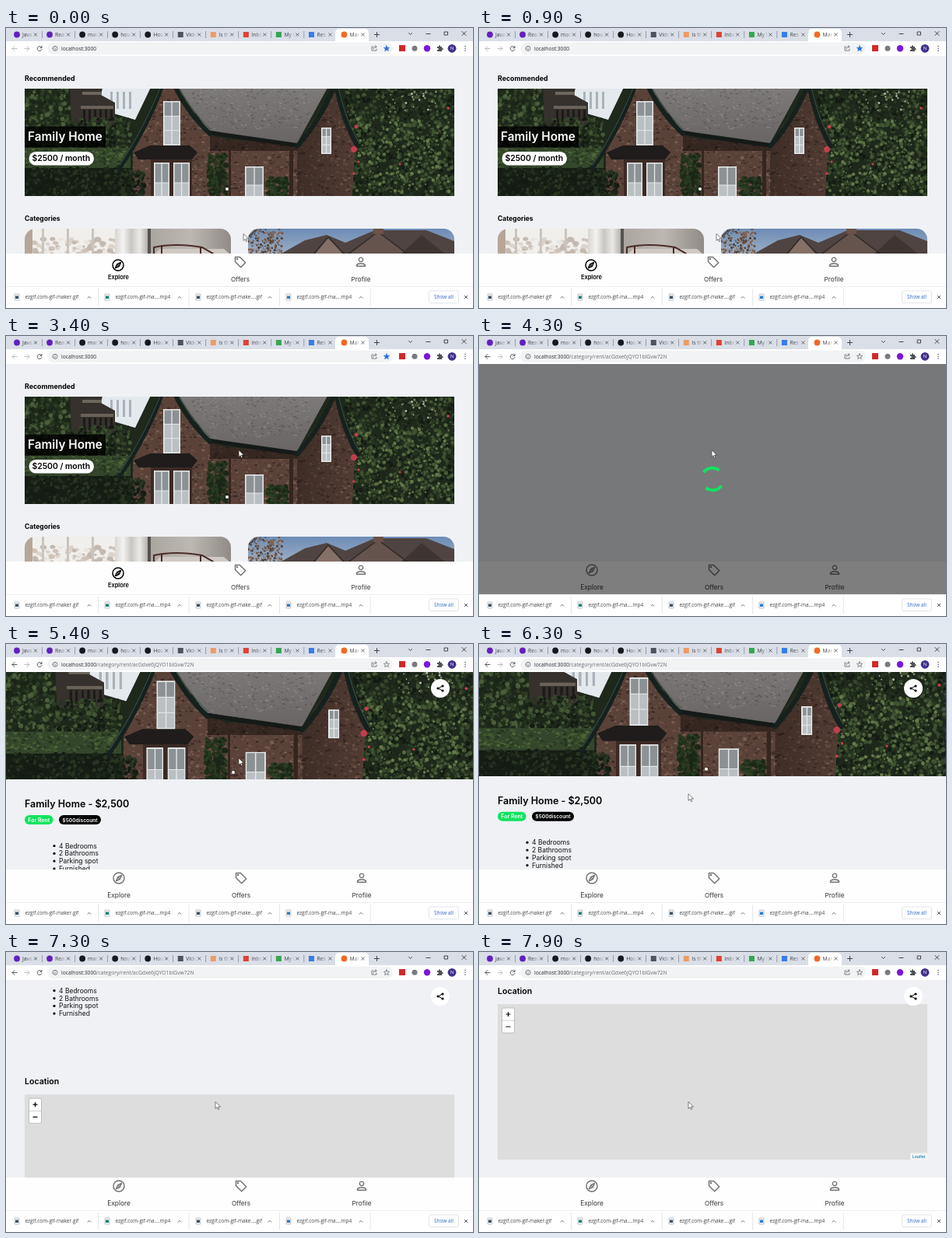
An HTML page with a canvas for the animation above (8 s loop, 600x360 px).

```html
<!DOCTYPE html>
<html lang="en">
<head>
<meta charset="utf-8">
<title>House listing</title>
<style>
html, body { margin: 0; width: 100%; height: 100%; overflow: hidden; background: #fff; }
canvas { display: block; width: 600px; height: 360px; }
</style>
</head>
<body>
<canvas id="stage" width="600" height="360"></canvas>
<script>
const LOOP = 8000, STEP = 100;
const LOAD_START = 3900, LOAD_END = 4700;
const UI = '"Open Sans", "Noto Sans", sans-serif', PAGE = 'Inter, Roboto, sans-serif';
const BG = '#eff1f5', GREEN = '#10e35f';
let g = document.getElementById('stage').getContext('2d');

// Drawing helpers
function rect(x, y, w, h, color) { g.fillStyle = color; g.fillRect(x, y, w, h); }
function round(x, y, w, h, r, fill, line) {
  g.beginPath(); g.roundRect(x, y, w, h, r);
  if (fill) { g.fillStyle = fill; g.fill(); }
  if (line) { g.strokeStyle = line; g.lineWidth = .7; g.stroke(); }
}
function dot(x, y, r, color) {
  g.beginPath(); g.arc(x, y, r, 0, 7); g.fillStyle = color; g.fill();
}
function poly(color, ...pts) {
  g.beginPath();
  for (let i = 0; i < pts.length; i += 2) g.lineTo(pts[i], pts[i + 1]);
  g.closePath(); g.fillStyle = color; g.fill();
}
function stroke(d, x, y, color, width = 1) {
  g.save(); g.translate(x, y);
  g.strokeStyle = color; g.lineWidth = width;
  g.lineCap = g.lineJoin = 'round';
  g.stroke(new Path2D(d)); g.restore();
}
function text(s, x, y, size, color, weight = 400, family = PAGE, align = 'left') {
  g.font = `${weight} ${size}px ${family}`;
  g.textAlign = align; g.fillStyle = color; g.fillText(s, x, y);
}
function shade(x0, y0, x1, y1, ...colors) {
  const s = g.createLinearGradient(x0, y0, x1, y1);
  colors.forEach((c, i) => s.addColorStop(i / (colors.length - 1), c));
  return s;
}
function seeded(seed) {
  return () => (seed = (seed * 16807) % 2147483647) / 2147483647;
}
function specks(n, x, y, w, h, size, colors, flat = 1) {
  const rnd = seeded(n * 31 + x);
  for (let i = 0; i < n; i++) {
    const px = x + rnd() * w, py = y + rnd() * h, s = size * (.5 + rnd());
    g.fillStyle = colors[Math.floor(rnd() * colors.length)];
    g.beginPath(); g.ellipse(px, py, s, s * flat, rnd() * (flat === 1 ? 3 : .2), 0, 7); g.fill();
  }
}
function pane(x, y, w, h, rows) {
  rect(x, y, w, h, '#e6e8e8');
  const pw = w / 2 - 2.2, ph = (h - 2) / rows - 1;
  for (let c = 0; c < 2; c++) for (let r = 0; r < rows; r++)
    rect(x + 1.6 + c * (pw + 1.3), y + 1.5 + r * (ph + 1), pw, ph, r ? '#b9bfc2' : '#8b9194');
}

// House photo in flat shapes, covering x 24-576 and y 78-216
function paintHouse() {
  const dark = ['#141b13', '#1d281a', '#273521'], leaf = [...dark, '#34462a', '#435734'];
  rect(24, 68, 552, 158, '#1e281b');

  // Garden and old tower on the left
  poly('#e4e9ee', 118, 68, 190, 68, 166, 118, 118, 104);
  for (let x = 134; x < 164; x += 8) rect(x, 82, 3, 22, '#a9b2b9');
  specks(420, 24, 70, 62, 84, 2, ['#2b3b24', '#3a4e2f', '#1a2417', '#223019', '#4a5e3a']);
  poly('#36312d', 82, 68, 126, 68, 122, 86, 140, 96, 140, 126, 84, 126);
  rect(98, 82, 25, 4, '#6d665c'); rect(96, 100, 42, 4, '#6a6258');
  for (let x = 99; x < 138; x += 7) rect(x, 105, 3, 14, '#1d1b19');
  specks(320, 84, 116, 76, 38, 1.9, leaf);
  rect(24, 154, 136, 26, '#34462c');
  specks(300, 24, 155, 130, 22, 1.8, ['#41582f', '#33472a', '#4e6538', '#263620'], .6);
  rect(24, 180, 150, 46, '#151d14');
  specks(320, 24, 180, 145, 36, 1.8, dark);

  // Shrubs on the right
  specks(1500, 436, 72, 142, 148, 1.9, leaf);
  specks(260, 450, 112, 120, 100, 1.7, ['#566b40', '#63794a', '#3d5230']);
  specks(34, 488, 74, 68, 34, 1, ['#a9b29f', '#7e8c72']);

  // Stone walls
  g.save(); g.beginPath();
  for (const [x, y] of [[201, 68], [218, 68], [258, 136], [285, 143], [374, 150], [424, 76],
    [449, 150], [444, 226], [163, 226], [163, 155]]) g.lineTo(x, y);
  g.clip();
  rect(150, 68, 310, 160, '#5a4239');
  specks(2100, 155, 68, 295, 152, 1.5, ['#6f5348', '#46322c', '#7c6055', '#3d2b27', '#614840'], .6);
  rect(262, 132, 112, 26, 'rgba(18,12,11,.5)');
  rect(374, 68, 80, 158, shade(374, 0, 452, 0, 'rgba(20,14,12,.4)', 'rgba(20,14,12,.1)'));
  rect(286, 150, 3, 70, '#35251f'); rect(364, 150, 5, 70, '#35251f');
  g.restore();

  // Slate roof with its eaves and barge boards
  poly(shade(0, 78, 0, 145, '#7d7a79', '#6a6666'), 214, 68, 418, 68, 374, 148, 290, 136, 260, 132);
  g.save(); g.globalAlpha = .5;
  specks(700, 240, 72, 150, 58, 1.3, ['#959190', '#4f4b4c', '#757172'], .5);
  g.restore();
  stroke('M260 134L290 139L374 151', 0, 0, '#151918', 5);
  stroke('M203 66Q184 125 143 184', 0, 0, '#16211d', 6);
  stroke('M214 68Q232 108 262 136', 0, 0, '#16211d', 6);
  stroke('M423 72Q405 118 374 152', 0, 0, '#16211d', 6);
  stroke('M424 72Q433 120 452 152', 0, 0, '#16211d', 6);
  stroke('M200 72Q179 126 146 176M219 70Q236 104 262 130M426 72Q436 118 453 146', 0, 0, '#3c554b', .9);

  pane(202, 94, 22, 57, 3);
  poly('#1f1c1b', 164, 160, 185, 151, 236, 151, 246, 160, 239, 169, 170, 169);
  rect(186, 169, 53, 50, '#3b2a25');
  pane(190, 173, 20, 52, 2); pane(215, 173, 21, 52, 2);
  pane(307, 178, 24, 48, 2); pane(405, 128, 13, 34, 3);
  specks(240, 260, 162, 24, 54, 2, ['#1a2617', '#283a21', '#213019']);
  specks(120, 335, 192, 27, 26, 2, ['#1b2818', '#2a3d23', '#202f1b']);
  specks(130, 138, 184, 40, 34, 2, dark);
  for (const [x, y, r] of [[447, 156, 4], [450, 127, 2.5], [453, 172, 1.6], [447, 187, 1.8], [506, 175, 1.5], [568, 103, 1.8]])
    dot(x, y, r, '#c23f4c');
}
function paintRoom() {
  rect(24, 258, 265, 34, '#f1efec');
  specks(90, 36, 270, 105, 22, 3, ['#dcd3ca', '#cfc3b8', '#e9e5e0', '#c3b9b0'], .7);
  rect(24, 258, 10, 34, '#b7a698');
  for (const x of [46, 78, 110]) rect(x, 258, 3, 34, '#c9c4be');
  rect(140, 258, 42, 34, shade(140, 0, 182, 0, '#d9d6d2', '#f4f3f1', '#c9c6c2', '#eceae7', '#b5b2ae'));
  rect(182, 258, 4, 34, '#55524f');
  rect(186, 258, 103, 34, shade(186, 0, 289, 0, '#aba69f', '#bdb8b1', '#908b86'));
  poly('#cfc9c4', 198, 284, 280, 284, 289, 292, 190, 292);
  stroke('M190 290V282Q218 276 252 282L266 290M200 280V290M250 282V290', 0, 0, '#4a2a26', 2);
}
function paintRoofs() {
  rect(311, 258, 265, 34, shade(0, 258, 0, 290, '#6d8cb6', '#9dafc5'));
  specks(260, 311, 258, 44, 34, 1.1, ['#6a5040', '#855f48', '#4a4039', '#8d97a8']);
  poly('#4f4441', 350, 292, 384, 273, 412, 266, 436, 276, 474, 260, 540, 260, 576, 274, 576, 292);
  poly('#857067', 396, 292, 414, 270, 434, 292);
  poly('#65544d', 440, 292, 478, 263, 516, 292);
  poly('#3e3533', 506, 292, 534, 266, 566, 292);
  stroke('M394 292L414 269L436 292M438 292L478 262L518 292', 0, 0, '#302a29', 1.4);
  rect(472, 258, 13, 7, '#6b5149');
}

// Static pictures are painted once at double size
function picture(x, y, w, h, paint) {
  const c = document.createElement('canvas');
  c.width = w * 2; c.height = h * 2;
  const keep = g;
  g = c.getContext('2d'); g.scale(2, 2); g.translate(-x, -y);
  paint();
  g = keep;
  return c;
}
const house = picture(24, 78, 552, 138, paintHouse);
const room = picture(24, 258, 265, 34, paintRoom);
const roofs = picture(311, 258, 265, 34, paintRoofs);

function card(img, x) {
  g.save(); g.beginPath(); g.roundRect(x, 258, 265, 60, 14); g.clip();
  g.drawImage(img, x, 258, 265, 34); g.restore();
}

// Browser frame
const TABS = [['Java', '#6220bd'], ['Reac', '#6220bd'], ['mac', '#15191e'], ['hous', '#15191e'],
  ['Hou', '#15191e'], ['Vide', '#4b5260', 1], ['Is th', '#ee9b67', 1], ['Inbo', '#db4335', 1],
  ['My D', '#35a653', 1], ['Res', '#377de8', 1], ['Mar', '#ed6a28']];
const CROSS = 'M-1.7 -1.7L1.7 1.7M1.7 -1.7L-1.7 1.7';

function drawTop(home) {
  rect(0, 0, 600, 18, '#dadee7');
  round(423, 1, 43, 22, [5, 5, 0, 0], '#fff');
  rect(0, 17, 600, 19, '#fff');
  TABS.forEach(([name, color, square], i) => {
    const x = 14 + i * 42.05;
    if (square) rect(x - 3.5, 5, 7, 7, color); else dot(x, 8.5, 3.9, color);
    text(name, x + 7, 11, 6.8, shade(x + 12, 0, x + 21, 0, '#3d4149', 'rgba(61,65,73,0)'), 400, UI);
    stroke(CROSS, x + 24, 8.5, '#42464e', .8);
    if (i < 9) rect(x + 32, 4, .8, 9, '#858b9b');
  });
  stroke('M-3 0H3M0 -3V3', 476.5, 8.5, '#3d424c');
  stroke('M-2 -1L0 1L2 -1', 519.5, 7.5, '#363a42', .9);
  stroke('M-2.5 0H2.5', 542.5, 7.5, '#222', .8);
  stroke('M-2 -2H2V2H-2Z', 565.5, 7, '#222', .8);
  stroke('M-2.5 -2.5L2.5 2.5M2.5 -2.5L-2.5 2.5', 588.5, 7, '#222', .8);

  stroke('M3 0H-3M0 -3L-3 0L0 3', 11, 26.5, home ? '#babdc2' : '#55595f');
  stroke('M-3 0H3M0 -3L3 0L0 3', 27, 26.5, '#babdc2');
  stroke('M2.6 -1.8A3 3 0 1 0 3 1M3 -3.2V-1H.8', 43, 26.5, '#55595f');
  round(53, 18.5, 444, 15.5, 8, '#f1f3f4');
  stroke('M-3 0A3 3 0 1 0 3 0A3 3 0 1 0 -3 0M0 0V1.5M0 -1.5V-1.4', 63, 26.3, '#5f6368', .8);
  text('localhost:3000', 71, 28.7, 6.7, '#25282c', 400, UI);
  if (!home) {
    const start = 71 + g.measureText('localhost:3000').width;
    text('/category/rent/acGdxe6jQYO1bIGvw72N', start, 28.7, 6.7, '#6a6e73', 400, UI);
  }
  stroke('M-1 -2H-3V3H3V1M-1 1Q-1 -2 3 -2M1.5 -3.5L3 -2L1.5 -.5', 473, 26, '#5f6368', .8);
  const star = 'M0 -3.5L1 -1.1L3.6 -1L1.6 .7L2.3 3.2L0 1.8L-2.3 3.2L-1.6 .7L-3.6 -1L-1 -1.1Z';
  if (home) {
    g.save(); g.translate(489, 26.3); g.fillStyle = '#2a6fdc'; g.fill(new Path2D(star)); g.restore();
  }
  stroke(star, 489, 26.3, home ? '#2a6fdc' : '#5f6368', .7);
  rect(505, 22, 8, 8, '#cf2929');
  dot(525, 26.3, 3.5, '#777b80');
  dot(541, 26.3, 4.2, '#7a18d6');
  poly('#4f5358', 554, 24, 556, 24, 556, 22.5, 558, 22.5, 558, 24, 560, 24, 560, 26, 561.5, 26,
    561.5, 28, 560, 28, 560, 30, 554, 30, 554, 28, 555.5, 28, 555.5, 26, 554, 26);
  dot(573, 26.3, 5.4, '#40308f');
  text('N', 573, 28.4, 6, '#fff', 400, UI, 'center');
  for (const y of [23.5, 26.3, 29.1]) dot(590, y, .8, '#55595f');
}
function drawDownloads() {
  rect(0, 332, 600, 28, '#fff');
  rect(0, 332, 600, .7, '#e3e5e8');
  [['ezgif.com-gif-maker.gif', 14, 107], ['ezgif.com-gif-ma....mp4', 130, 223],
    ['ezgif.com-gif-make....gif', 247, 339], ['ezgif.com-gif-ma....mp4', 363, 456]]
    .forEach(([name, x, arrow], i) => {
      round(x - 3, 342, 6, 8, .5, '#f2f4f7', '#a6adb7');
      rect(x - 2, 344.5, 4, 3.5, ['#3d5362', '#188477', '#3d5362', '#267dcc'][i]);
      text(name, x + 10.5, 348.3, 6.5, '#414448', 400, UI);
      stroke('M-2 1L0 -1L2 1', arrow, 346.3, '#62666b', .9);
      rect(118.3 + i * 116.5, 335, .7, 22, '#d9dbdf');
    });
  round(543.5, 338, 38, 15.5, 2, '#fff', '#d5d9df');
  text('Show all', 562.5, 348.2, 6.5, '#2c67c5', 400, UI, 'center');
  stroke(CROSS, 591, 346, '#505459');
}

// Page parts
function drawNav(home) {
  rect(0, 290, 600, 42, '#fefefe');
  const dx = home ? -1 : 0, grey = '#747474', ink = home ? '#000' : grey, cy = home ? 305 : 301;
  stroke('M-7 0A7 7 0 1 0 7 0A7 7 0 1 0 -7 0M3.5 -3.5L1.3 1.3L-3.5 3.5L-1.3 -1.3Z', 145 + dx, cy, ink, 1.5);
  dot(145 + dx, cy, .9, ink);
  stroke('M-6.5 -6.5H-.5L6.7 .7L.7 6.7L-6.5 -.5Z', 302 + dx, 301, grey, 1.5);
  dot(298 + dx, 297, 1.2, grey);
  stroke('M-2.7 -3.2A2.7 2.7 0 1 0 2.7 -3.2A2.7 2.7 0 1 0 -2.7 -3.2M-5.5 5.3V3.8Q-4 1.7 0 1.7Q4 1.7 5.5 3.8V5.3Z', 457 + dx, 301, grey, 1.4);
  if (home) text('Explore', 144.5, 323, 7.4, '#000', 600, PAGE, 'center');
  else text('Explore', 145, 326, 8.4, '#333', 400, PAGE, 'center');
  text('Offers', 302 + dx, 326, 8.2, '#333', 400, PAGE, 'center');
  text('Profile', 457 + dx, 326, 8.2, '#333', 400, PAGE, 'center');
}
function drawHome() {
  text('Recommended', 24, 67.5, 8.8, '#000', 700);
  g.drawImage(house, 24, 78, 552, 138);
  dot(284, 207, 2, '#fff');
  rect(24, 126.5, 104, 27, 'rgba(0,0,0,.82)');
  text('Family Home', 28, 145, 15.3, '#fff', 600);
  round(29.5, 159, 83.5, 17.5, 8.7, '#fff');
  text('$2500 / month', 33.5, 171.3, 10.4, '#000', 600);
  text('Categories', 24, 247.5, 8.5, '#000', 700);
  card(room, 24); card(roofs, 311);
}
function drawListing(scroll) {
  g.save(); g.translate(0, -scroll);
  const k = 552 / 600, crop = 138 * (1 - k);
  g.drawImage(house, 0, crop, 1104, 276 - 2 * crop, 0, 36, 600, 138);
  dot(292, 165, 2, '#fff');
  text('Family Home - $2,500', 24, 210, 12.5, '#000', 600);
  round(24, 220, 36.5, 12, 6, GREEN);
  text('For Rent', 42.3, 228.5, 7, '#fff', 600, PAGE, 'center');
  round(68, 220, 54, 12, 6, '#000');
  text('$500discount', 95, 228.5, 6.7, '#fff', 600, PAGE, 'center');
  ['4 Bedrooms', '2 Bathrooms', 'Parking spot', 'Furnished'].forEach((item, i) => {
    const y = 259.5 + i * 9.8;
    dot(62, y, 1.6, '#000');
    text(item, 68, y + 3, 8.5, '#111');
  });
  text('Location', 24, 380, 10.6, '#000', 600);
  rect(24, 393, 552, 200, '#ddd');
  round(29.5, 398, 16, 32, 2, '#fff', '#aaa');
  rect(29.5, 413.7, 16, .7, '#bbb');
  stroke('M-2.5 0H2.5M0 -2.5V2.5', 37.5, 406, '#000', 1.2);
  stroke('M-2.5 0H2.5', 37.5, 422, '#000', 1.2);
  rect(554, 584.5, 22, 8.5, '#f5f5f5');
  text('Leaflet', 565, 590.6, 5.6, '#0078a8', 400, '"Liberation Sans", sans-serif', 'center');
  g.restore();
  dot(558, 57, 12, '#fff');
  stroke('M3 -3L-3 0L3 3', 558, 57, '#000', 1);
  for (const [x, y] of [[561, 54], [555, 57], [561, 60]]) dot(x, y, 1.6, '#000');
}
function drawLoading(t) {
  rect(0, 36, 600, 296, 'rgba(0,0,0,.5)');
  const turn = ((t - 4300) / 1200 * 360 - 8) * Math.PI / 180;
  g.strokeStyle = GREEN; g.lineWidth = 4;
  for (const mid of [-Math.PI / 2, Math.PI / 2]) {
    g.beginPath();
    g.arc(300, 184, 14.3, turn + mid - Math.PI / 4, turn + mid + Math.PI / 4);
    g.stroke();
  }
}
function drawCursor([x, y]) {
  const d = 'M0 0V8.4L2 6.5L3.4 9.6L4.8 9L3.4 6L6.2 5.9Z';
  g.save(); g.translate(x, y); g.fillStyle = '#fff'; g.fill(new Path2D(d)); g.restore();
  stroke(d, x, y, '#333', .6);
}

// Eased keyframes: [time, ...values]
function at(t, keys) {
  const i = keys.findIndex(k => k[0] > t);
  if (i === 0) return keys[0].slice(1);
  if (i < 0) return keys[keys.length - 1].slice(1);
  const a = keys[i - 1], b = keys[i], u = (t - a[0]) / (b[0] - a[0]), e = u * u * (3 - 2 * u);
  return a.slice(1).map((v, j) => v + (b[j + 1] - v) * e);
}
const POINTER = [[1200, 305, 265], [2100, 300, 147], [3700, 299, 147], [5500, 299, 147], [6200, 269, 193]];
const SCROLL = [[6250, 0], [6600, 78], [6850, 78], [7150, 156], [7550, 326]];

function frame() {
  const t = Math.floor(performance.now() % LOOP / STEP) * STEP;
  const home = t < LOAD_START, loading = !home && t < LOAD_END;
  rect(0, 0, 600, 360, BG);
  if (home) drawHome();
  else if (!loading) drawListing(at(t, SCROLL)[0]);
  drawNav(home);
  if (loading) drawLoading(t);
  drawTop(home);
  drawDownloads();
  drawCursor(at(t, POINTER));
  requestAnimationFrame(frame);
}
frame();
</script>
</body>
</html>
```
